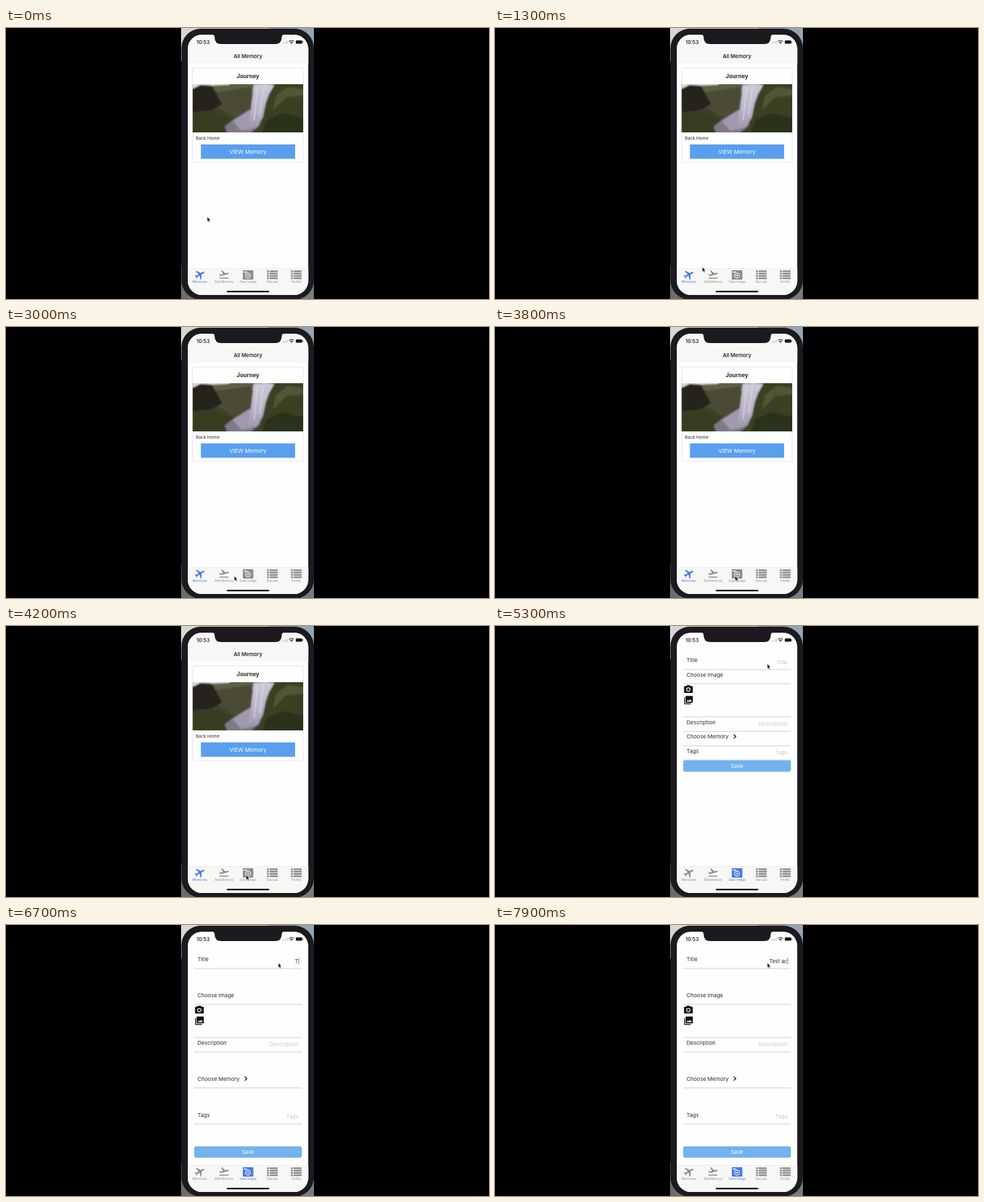
An HTML page for the animation above (8 s loop, 720 by 405 pixels).

```html
<!DOCTYPE html>
<html lang="en">
<head>
<meta charset="utf-8">
<title>Memory app</title>
<style>
  html, body { margin: 0; width: 100%; height: 100%; overflow: hidden; background: #000; }
  svg { display: block; width: 100vw; height: 100vh; }
  text { font: 8px Inter, "Liberation Sans", sans-serif; fill: #2c2c2e; }
  .mid { text-anchor: middle; }
  .end { text-anchor: end; }
  .hint { fill: #c9c9ce; }
  .white { fill: #fafcff; }
  .rule { stroke: #c4c4c6; stroke-width: .8; }
  .tab { fill: #8d8d90; }
  .tab text { font-size: 4.6px; fill: inherit; text-anchor: middle; }
  .hole { fill: #f7f7f6; }

  /* Every change shares one 8 s clock. */
  .list, .form, .tab, .drop, .caret, .hint1, .typed tspan { animation: 8s step-end infinite; }
  .list { animation-name: leave; }
  .form { animation-name: enter; }
  .tab.first { animation-name: dim; }
  .tab.third { animation-name: light; }
  .drop { animation-name: drop; }
  .caret { animation-name: focus; }
  .hint1 { animation-name: clear; }
  @keyframes leave { 0% { visibility: visible } 53.75%, 100% { visibility: hidden } }
  @keyframes enter { 0% { visibility: hidden } 53.75%, 100% { visibility: visible } }
  @keyframes dim { 0% { fill: #4c78e6 } 53.75%, 100% { fill: #8d8d90 } }
  @keyframes light { 0% { fill: #8d8d90 } 53.75%, 100% { fill: #4c78e6 } }
  @keyframes drop { 0% { transform: none } 82.5%, 100% { transform: translateY(var(--d)) } }
  @keyframes focus { 0% { opacity: 0 } 71.25%, 100% { opacity: 1 } }
  @keyframes clear { 0% { opacity: 1 } 82.5%, 100% { opacity: 0 } }

  /* Typing: one letter every 200 ms, each taking up room from its own moment on. */
  .typed { white-space: pre; }
  .typed tspan { font-size: 7.8px; }
  .typed tspan:nth-child(1) { animation-name: k1; }
  .typed tspan:nth-child(2) { animation-name: k2; }
  .typed tspan:nth-child(3) { animation-name: k3; }
  .typed tspan:nth-child(4) { animation-name: k4; }
  .typed tspan:nth-child(5) { animation-name: k5; }
  .typed tspan:nth-child(6) { animation-name: k6; }
  .typed tspan:nth-child(7) { animation-name: k7; }
  @keyframes k1 { 0% { font-size: 0 } 82.5% { font-size: 7.8px } }
  @keyframes k2 { 0% { font-size: 0 } 85% { font-size: 7.8px } }
  @keyframes k3 { 0% { font-size: 0 } 87.5% { font-size: 7.8px } }
  @keyframes k4 { 0% { font-size: 0 } 90% { font-size: 7.8px } }
  @keyframes k5 { 0% { font-size: 0 } 92.5% { font-size: 7.8px } }
  @keyframes k6 { 0% { font-size: 0 } 95% { font-size: 7.8px } }
  @keyframes k7 { 0% { font-size: 0 } 97.5% { font-size: 7.8px } }

  .cursor { animation: point 8s linear infinite; }
  @keyframes point {
    0% { transform: translate(300px, 282px) }
    16.25% { transform: translate(309px, 357px) }
    30% { transform: translate(327px, 372px) }
    47.5%, 53.75% { transform: translate(358px, 372px) }
    65%, 100% { transform: translate(406px, 56.5px) }
  }
</style>
</head>
<body>
<svg viewBox="0 0 720 405">
  <defs>
    <clipPath id="photo"><rect x="278.5" y="84" width="164.5" height="72"/></clipPath>
    <clipPath id="screen"><rect x="271" y="10" width="179.5" height="389" rx="21"/></clipPath>
    <filter id="soft" x="-30%" y="-30%" width="160%" height="160%"><feGaussianBlur stdDeviation="1.1"/></filter>
    <linearGradient id="fall" x2="0" y2="1">
      <stop stop-color="#cfcbd8"/><stop offset=".6" stop-color="#b9b3c8"/><stop offset="1" stop-color="#9c95aa"/>
    </linearGradient>
    <path id="rows" d="M-8-6.5h3v2.4h-3zM-8-3h3v2.4h-3zM-8 .5h3v2.4h-3zM-8 4h3v2.4h-3zM-4-6.5H8v2.4H-4zM-4-3H8v2.4H-4zM-4 .5H8v2.4H-4zM-4 4H8v2.4H-4z"/>
  </defs>

  <rect width="720" height="405"/>
  <!-- desktop behind the phone -->
  <rect x="261" width="131" height="50" fill="#d6d6d3"/>
  <rect x="392" width="67" height="50" fill="#93a6b4"/>
  <rect x="261" y="355" width="99" height="50" fill="#6c6c68"/>
  <rect x="360" y="355" width="99" height="50" fill="#757d80"/>
  <!-- body and screen -->
  <rect x="261.5" y="1" width="197.5" height="405" rx="29" fill="#1b1b1f"/>
  <g clip-path="url(#screen)">
    <rect x="271" y="10" width="180" height="389" fill="#fefefe"/>
    <rect class="list" x="271" y="10" width="180" height="43" fill="#f7f7f6"/>
    <rect x="271" y="360" width="180" height="40" fill="#f7f7f6"/>
    <path d="M271 359.5h180" stroke="#e6e6e8" stroke-width=".7"/>
  </g>
  <path d="M307 9.5q4 .5 4 4.500q0 10 10 10h80q10 0 10-10q0-4 4-4.500z" fill="#1b1b1f"/>

  <!-- status bar -->
  <text x="284" y="23.7" style="font-size:7.4px;font-weight:600">10:53</text>
  <path d="M412 21.5h1.500v2H412zM414.300 21h1.500v2.500h-1.500zM416.600 20h1.500v3.500h-1.500zM418.900 19h1.500v4.500h-1.500z" fill="#d0d0d2"/>
  <path d="M422 20q3.500-3 7 0M423.500 21.800q2-1.500 4 0" fill="none" stroke="#202022" stroke-width="1.2"/>
  <circle cx="425.5" cy="23.2" r=".8" fill="#202022"/>
  <rect x="432" y="18.5" width="9.5" height="5" rx="1.2" fill="#18181a"/>
  <path d="M442.200 20v2" stroke="#18181a"/>

  <!-- memory list -->
  <g class="list">
    <text class="mid" x="360.7" y="44.7" style="font-size:7.7px;font-weight:600">All Memory</text>
    <rect x="278.5" y="59.5" width="164.5" height="141.5" rx="1.5" fill="#fefefe" stroke="#e6e6f4"/>
    <text class="mid" x="360.7" y="75.3" style="font-size:8.4px;font-weight:700">Journey</text>
    <g clip-path="url(#photo)">
      <rect x="278" y="84" width="166" height="73" fill="#3d4228"/>
      <g filter="url(#soft)">
        <path d="M276 80h100v14l-34 3-30-2-36-2z" fill="#5d6144"/>
        <path d="M276 80h62l-6 5-22 1-12 3-8 2-14-1z" fill="#dcdcdc"/>
        <path d="M312 96l54-8-2 36-24 10-28-18z" fill="#4b4b36"/>
        <path d="M276 92l14-7 17 1 7 13 8 15-16 9-30 6z" fill="#25231a"/>
        <path d="M276 126l30-3 30 12-4 24h-56z" fill="#383e20"/>
        <path d="M400 80h46v78h-66l2-32z" fill="#3b4124"/>
        <path d="M402 102l18-14 26 4v9l-28 2-20 20z" fill="#525636"/>
        <path d="M388 138l24-11 34 8v26h-66z" fill="#2b301b"/>
        <path d="M326 147l14-11 24-14 18 6-4 18-14 12h-34z" fill="#7f7887"/>
        <path d="M338 139l24-16 18 3-5 22-24 6z" fill="#a199ad"/>
        <path d="M369 85l17-2 14 2-8 14-5 14-4 20-8 15-14 4 4-32z" fill="url(#fall)"/>
      </g>
      <path d="M375 88l-5 50M384 88l-6 42" stroke="#dcd8e4" stroke-width="2" opacity=".6"/>
    </g>
    <text x="283" y="167.300" style="font-size:6.5px">Back Home</text>
    <rect x="290.5" y="174" width="140.5" height="21.5" fill="#5a9fee"/>
    <text class="mid white" x="360.7" y="187.8" style="font-size:8.2px">VIEW Memory</text>
  </g>

  <!-- image form -->
  <g class="form">
    <text x="285.5" y="54">Title</text>
    <text class="end hint hint1" x="436" y="56.8">Title</text>
    <text class="end typed" x="435.5" y="56.8"><tspan>T</tspan><tspan>e</tspan><tspan>s</tspan><tspan>t</tspan><tspan> </tspan><tspan>a</tspan><tspan>c</tspan></text>
    <path class="caret" d="M436.200 49v10" stroke="#5c78e0"/>
    <path class="rule" d="M280.500 65h160.500"/>
    <g class="drop" style="--d:32.3px">
      <text x="285.5" y="75.8">Choose Image</text>
      <path class="rule" d="M280.500 86.300h160.500M280.500 135.800h160.500M280.500 157.500h160.500"/>
      <g fill="#0c0c0c">
        <path fill-rule="evenodd" d="M286 88.500h4.500l1.300 1.500h2.200q.8 0 .8.800v8.400q0 .8-.8.800h-11.400q-.8 0-.8-.8v-8.400q0-.8.8-.8h2.200zM288.200 91.600a3.300 3.300 0 1 0 .01 0z"/>
        <circle cx="288.2" cy="94.9" r="2"/>
        <path fill-rule="evenodd" d="M285 104.500h9q.8 0 .8.800v8.600q0 .8-.8.800h-9q-.8 0-.8-.8v-8.600q0-.8.800-.8zM285.600 113h7.800l-2.600-3.500-1.900 2.400-1.300-1.600z"/>
        <path d="M282 107h1.200v8.700h8.700v1.200h-9q-.9 0-.9-.9z"/>
      </g>
      <text x="285.5" y="146.6">Description</text>
      <text class="end hint" x="436" y="149.2">Description</text>
    </g>
    <g class="drop" style="--d:64.5px">
      <text x="285.5" y="168.2">Choose Memory</text>
      <path d="M355.800 162l3.200 3-3.200 3" fill="none" stroke="#151515" stroke-width="1.3"/>
      <path class="rule" d="M280.500 179h160.500"/>
    </g>
    <g class="drop" style="--d:97px">
      <text x="285.5" y="189.7">Tags</text>
      <text class="end hint" x="436" y="192.2">Tags</text>
      <path class="rule" d="M280.500 200.200h160.500"/>
    </g>
    <g class="drop" style="--d:130px">
      <rect x="280.5" y="200.8" width="160.5" height="17" rx="3" fill="#72b2ee"/>
      <text class="mid white" x="360.7" y="212.2">Save</text>
    </g>
  </g>

  <!-- tab bar -->
  <g class="tab first">
    <path transform="translate(289 368.5) rotate(60) scale(.76) translate(-11.5 -12)" d="M21 16v-2l-8-5V3.500c0-.83-.67-1.500-1.500-1.500S10 2.670 10 3.500V9l-8 5v2l8-2.500V19l-2 1.500V22l3.500-1 3.500 1v-1.500L13 19v-5.500l8 2.500z"/>
    <text x="289" y="380.6">Memories</text>
  </g>
  <g class="tab">
    <path transform="translate(316.5 359.8) scale(.7)" d="M2.500 19h19v2h-19zm19.570-9.360c-.21-.8-1.040-1.280-1.840-1.060L14.920 10l-6.900-6.430-1.930.51 4.140 7.170-4.970 1.330-1.970-1.540-1.450.39 2.590 4.490s7.120-1.900 16.570-4.430c.81-.23 1.280-1.050 1.070-1.850z"/>
    <text x="325" y="380.6">Add Memory</text>
  </g>
  <g class="tab third">
    <rect x="353" y="362" width="15.7" height="14" rx="1"/>
    <path class="hole" d="M354.300 364h5.500l-1 1.500h-4.500z"/>
    <circle class="hole" cx="360.8" cy="370" r="4.2"/>
    <circle cx="360.8" cy="370" r="3.1"/>
    <circle class="hole" cx="360.8" cy="370" r="1.3"/>
    <text x="361" y="380.6">Save Image</text>
  </g>
  <g class="tab">
    <use href="#rows" x="397" y="368.8"/>
    <text x="397" y="380.6">Discuss</text>
  </g>
  <g class="tab">
    <use href="#rows" x="432.7" y="368.8"/>
    <text x="432.7" y="380.6">Profile</text>
  </g>
  <rect x="329" y="392.7" width="63.5" height="2.2" rx="1.1" fill="#0c0c0e"/>

  <path class="cursor" d="M0 0v7.300l1.600-1.400 1.200 2.700 1.200-.6-1.200-2.500h2.100z" fill="#080808" stroke="#fefefe" stroke-width=".5"/>
</svg>
</body>
</html>
```
